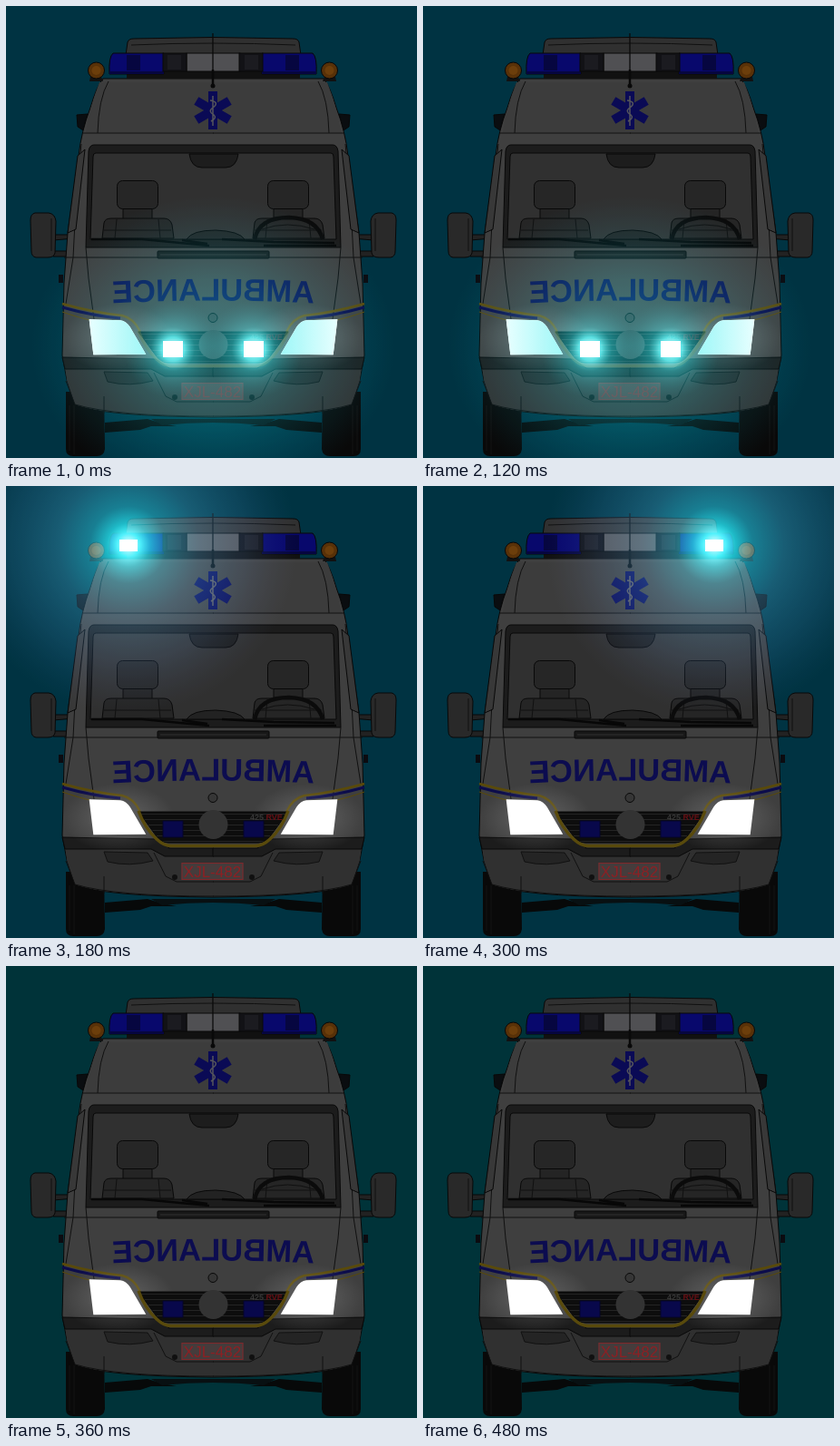
Write an HTML page that moves like this. It is 453 px wide and 498 px high and loops after 0.54 s.

```html
<!DOCTYPE html>
<html lang="en">
<head>
<meta charset="utf-8">
<title>Ambulance lights</title>
<style>
html, body { margin: 0; width: 100%; height: 100%; overflow: hidden; background: #003339; }
svg { display: block; width: 453px; height: 498px; }
text { font-family: "Liberation Sans", Arial, sans-serif; }
.ink { stroke: #080808; stroke-width: 1; }
.line { fill: none; stroke: #101010; stroke-width: 1; }
.body { fill: #3f3f3f; }
.glow { mix-blend-mode: screen; }
.flash { opacity: 0; }
</style>
</head>
<body>
<svg viewBox="0 0 453 498">
<defs>
  <radialGradient id="lamp">
    <stop offset="0" stop-color="#d8ffff"/>
    <stop offset=".24" stop-color="#5cf0f2" stop-opacity=".9"/>
    <stop offset=".45" stop-color="#20a8ac" stop-opacity=".55"/>
    <stop offset="1" stop-color="#086066" stop-opacity="0"/>
  </radialGradient>
  <radialGradient id="wash">
    <stop offset="0" stop-color="#087478" stop-opacity=".75"/>
    <stop offset=".45" stop-color="#075a5f" stop-opacity=".55"/>
    <stop offset="1" stop-color="#043c48" stop-opacity="0"/>
  </radialGradient>
  <radialGradient id="beacon">
    <stop offset="0" stop-color="#fff"/>
    <stop offset=".07" stop-color="#48f0fa"/>
    <stop offset=".13" stop-color="#22bcc9" stop-opacity=".9"/>
    <stop offset=".23" stop-color="#207f92" stop-opacity=".75"/>
    <stop offset=".42" stop-color="#255068" stop-opacity=".65"/>
    <stop offset=".7" stop-color="#1c3048" stop-opacity=".45"/>
    <stop offset="1" stop-color="#161c30" stop-opacity="0"/>
  </radialGradient>
  <radialGradient id="soft">
    <stop offset="0" stop-color="#fff" stop-opacity=".2"/>
    <stop offset="1" stop-color="#fff" stop-opacity="0"/>
  </radialGradient>
  <linearGradient id="tint">
    <stop offset="0" stop-color="#e6ffff"/>
    <stop offset="1" stop-color="#9df5f5"/>
  </linearGradient>
  <pattern id="slats" width="6" height="6" patternUnits="userSpaceOnUse">
    <rect width="6" height="6" fill="#0d0d0d"/>
    <path d="M0 1.5H6" stroke="#242424"/>
  </pattern>
  <path id="headlight" d="M92.500 346L126 347Q132 348 136 354L153 383L97 383.500Z" stroke-width="1.500"/>

  <g id="side">
    <path d="M66 425H108L109 488Q108 496 100 496H74Q66 496 66 488Z" fill="#090909"/>
    <path d="M70 440V490M75 440V494" stroke="#151515"/>
    <path d="M109 459L156 455L172 460L188 463L160 463L148 467L109 470Z" fill="#070909"/>
    <path d="M78 120L90 119L85 137L79 133Z" fill="#0a0d10" class="ink"/>
    <path d="M52 252H70L75 248V256L52 258ZM53 270H70L74 276H52Z" fill="#222" class="ink"/>
    <path d="M32 228H47Q54 229 55 237L54 272Q53 277 46 277H33Q28 276 28 270L27 236Q27 229 32 228Z" fill="#292929" class="ink"/>
    <path d="M50 234V270" class="line"/>
    <path d="M58 296H63V305H58Z" fill="#0b0b10"/>
  </g>
  <g id="details">
    <path d="M113 83Q102 102 101 140M85 140H229M83 152Q77 210 74 277" class="line"/>
    <path d="M79 165L87 158L77 246L68 250Z" fill="#383838" class="ink"/>
    <path d="M88 266L91 300L97 345M64 277H229M74 277L66 328" class="line"/>
    <path d="M62 328Q98 338 128 341Q141 344 148 359" fill="none" stroke="#5a4a09" stroke-width="2.400"/>
    <path d="M62 332Q98 342 126 344" fill="none" stroke="#0c0c4b" stroke-width="3"/>
    <path d="M62 337Q82 344 93 346" fill="none" stroke="#594908" stroke-width="1"/>
    <path d="M62 387L165 389L180 399H229V408H175L160 400H65Z" fill="#1c1c1c" class="ink"/>
    <path d="M108 403L156 404L162 413Q136 420 112 414Z" fill="#242424" stroke="#111"/>
    <path d="M66 413L76 439Q120 452 229 452M108 430V449M163 404L176 430L188 436H229" class="line"/>
    <circle cx="186" cy="431" r="3" fill="#101010"/>
    <ellipse cx="124" cy="366" rx="62" ry="38" fill="url(#soft)"/>
    <use href="#headlight" fill="#fff" stroke="#fff"/>
  </g>
  <g id="seat">
    <rect x="129" y="219" width="32" height="18" fill="#242424" class="ink"/>
    <rect x="122.500" y="192.500" width="45" height="31" rx="6" fill="#262626" class="ink"/>
    <path d="M106 256L108 239Q109 234 116 234H174Q181 234 183 241L185 256Z" fill="#252525" class="ink"/>
    <path d="M122 235L120 256M168 235L170 256M108 247H182" class="line"/>
  </g>
  <g id="roofEnd">
    <path d="M118 52H174V75H114Q113 56 118 52Z" fill="#08086c" class="ink"/>
    <path d="M133 54H148V71H133ZM114 72H174V75H114Z" fill="#060640"/>
    <rect x="173" y="52" width="26" height="20" fill="#121216" class="ink"/>
    <rect x="178" y="54" width="15" height="16" fill="#1b1b20"/>
    <path d="M93 78H105L107 83H92Z" fill="#111"/>
    <circle cx="99.500" cy="71" r="9" fill="#583108" class="ink"/>
    <circle cx="99.500" cy="71" r="5" fill="#6c3e0b"/>
  </g>
  <g id="grilleLamp">
    <circle cx="184" cy="378" r="54" fill="url(#lamp)"/>
    <rect x="173" y="369" width="22" height="18" fill="#fff"/>
  </g>
  <g id="roofLamp">
    <circle cx="135" cy="65" r="185" fill="url(#beacon)"/>
    <rect x="125" y="59" width="20" height="13" fill="#fff"/>
  </g>
  <path id="arch" d="M-120 3Q0-4 120 3"/>
</defs>

<rect width="453" height="498" fill="#003339"/>
<rect id="blueSky" class="flash" width="453" height="498" fill="#003342"/>

<use href="#side"/><use href="#side" transform="matrix(-1 0 0 1 457 0)"/>
<path d="M160 455H297L284 462Q228 456 172 462Z" fill="#081012"/>

<!-- Shell and roof -->
<path d="M132 54L134 40Q135 36 141 36Q228 33 316 36Q322 36 323 40L325 54Z" fill="#303030" class="ink"/>
<path d="M138 43Q228 39 319 43" class="line"/>
<path d="M107 80H350Q357 88 364 112Q374 138 377 165L389 250L393 305L395 385L390 412L381 439Q350 452 228 453Q106 452 76 439L67 412L62 385L64 305L68 250L80 165Q83 138 93 112Q100 88 107 80Z" class="body ink"/>
<path d="M103 84Q92 112 88 139H369Q365 112 354 84Z" fill="#3c3c3c"/>
<path d="M66 400H391L390 412L381 439Q350 451 228 452Q106 451 76 439L67 412Z" fill="#303030"/>
<rect x="133" y="72" width="191" height="8" fill="#111"/>
<rect x="199" y="52" width="59" height="20" fill="#505053" class="ink"/>
<use href="#roofEnd"/><use href="#roofEnd" transform="matrix(-1 0 0 1 456 0)"/>

<!-- Windscreen and cabin -->
<path d="M97 153H360Q365 153 366 160L369 266H88L91 160Q92 153 97 153Z" fill="#1c1c1c" class="ink"/>
<path d="M99 162H358Q361 162 361 166L364 257H93L96 166Q96 162 99 162Z" fill="#303030" class="ink"/>
<path d="M202 163H256Q254 178 242 178H216Q204 178 202 163Z" fill="#1d1d1d" class="ink"/>
<use href="#seat"/><use href="#seat" x="166"/>
<path d="M199 257Q205 247 231 247Q257 248 263 257Z" fill="#222" class="ink"/>
<path d="M274 257Q279 233 312 233Q343 234 349 257" fill="none" stroke="#0b0b0b" stroke-width="4.500"/>
<path d="M282 246Q310 236 340 246" class="line"/>
<path d="M94 257L150 257L224 264M194 258L222 262M238 257L295 260L362 261M284 264H364" fill="none" stroke="#070707" stroke-width="2.500"/>

<use href="#details"/><use href="#details" transform="matrix(-1 0 0 1 457 0)"/>
<rect x="167" y="270" width="123" height="8" rx="1" fill="#181818" class="ink"/>
<path d="M170 274H287" stroke="#303030"/>

<!-- Medical symbol and antenna -->
<g transform="translate(228 115)" fill="#0a0a55">
  <path id="bar" d="M-5-21H5V21H-5Z"/>
  <use href="#bar" transform="rotate(60)"/><use href="#bar" transform="rotate(-60)"/>
  <path d="M0-16V17M-3-11Q8-9 0-3Q-6 1 1 5Q5 8-2 12" fill="none" stroke="#55555c" stroke-width="1.500"/>
</g>
<path d="M228 30V88" stroke="#0a0a0a" stroke-width="1.300"/>
<path d="M228 70V90" stroke="#090909" stroke-width="2.500"/>
<circle cx="228" cy="88" r="2.500" fill="#090909"/>

<text transform="translate(228.500 325) scale(-1 1)" text-anchor="middle" font-size="34.500" font-weight="700" fill="#0c0c50"><textPath href="#arch" startOffset="50%">AMBULANCE</textPath></text>

<!-- Grille -->
<circle cx="228" cy="343.500" r="5" fill="#363636" class="ink"/>
<path d="M146 359H311L289 389Q284 393 278 393H179Q173 393 168 389Z" fill="url(#slats)" class="ink"/>
<path d="M146 358Q153 377 166 389Q174 396.500 182 396.500H275Q283 396.500 291 389Q304 377 311 358" fill="none" stroke="#594a0c" stroke-width="3.500" class="warm"/>
<path d="M173 369H195V387H173ZM262 369H284V387H262Z" fill="#08084b" stroke="#05052a"/>
<circle cx="228.500" cy="373" r="16" fill="#333"/>
<text x="269" y="368" font-size="9" font-weight="700" fill="#383838" class="warm">425 <tspan fill="#651014">RVE</tspan></text>

<!-- Number plate -->
<rect x="194" y="415.500" width="67" height="18" fill="#453c3c" stroke="#453c3c"/>
<g class="warm">
  <rect x="194" y="415.500" width="67" height="18" fill="none" stroke="#80272a"/>
  <text x="227.500" y="430.500" text-anchor="middle" font-size="17" fill="#8c2024">XJL-482</text>
</g>

<g class="flash tint">
  <use href="#headlight" fill="url(#tint)" stroke="url(#tint)"/>
  <use href="#headlight" fill="url(#tint)" stroke="url(#tint)" transform="matrix(-1 0 0 1 457 0)"/>
</g>
<g id="grille" class="flash glow">
  <ellipse cx="228" cy="375" rx="200" ry="165" fill="url(#wash)"/>
  <use href="#grilleLamp"/><use href="#grilleLamp" transform="matrix(-1 0 0 1 457 0)"/>
</g>
<g id="left" class="flash glow"><use href="#roofLamp"/></g>
<g id="right" class="flash glow"><use href="#roofLamp" transform="matrix(-1 0 0 1 456 0)"/></g>
</svg>
<script>
// One letter per 60 ms: grille, left beacon, right beacon, or dark.
const STEPS = [..."GLGLDRDRD"];
const STEP_MS = 60;

function blink(selector, lit, on = 1, off = 0) {
  const frames = STEPS.map((step, i) => ({
    opacity: lit.includes(step) ? on : off,
    offset: i / STEPS.length,
    easing: "step-end"
  }));
  frames.push({ opacity: frames[0].opacity, offset: 1 });
  for (const el of document.querySelectorAll(selector)) {
    el.animate(frames, { duration: STEPS.length * STEP_MS, iterations: Infinity });
  }
}

blink("#grille, .tint", "G");
blink("#left", "L");
blink("#right", "R");
blink("#blueSky", "GLR");
blink(".warm", "G", 0.5, 1);
</script>
</body>
</html>
```
